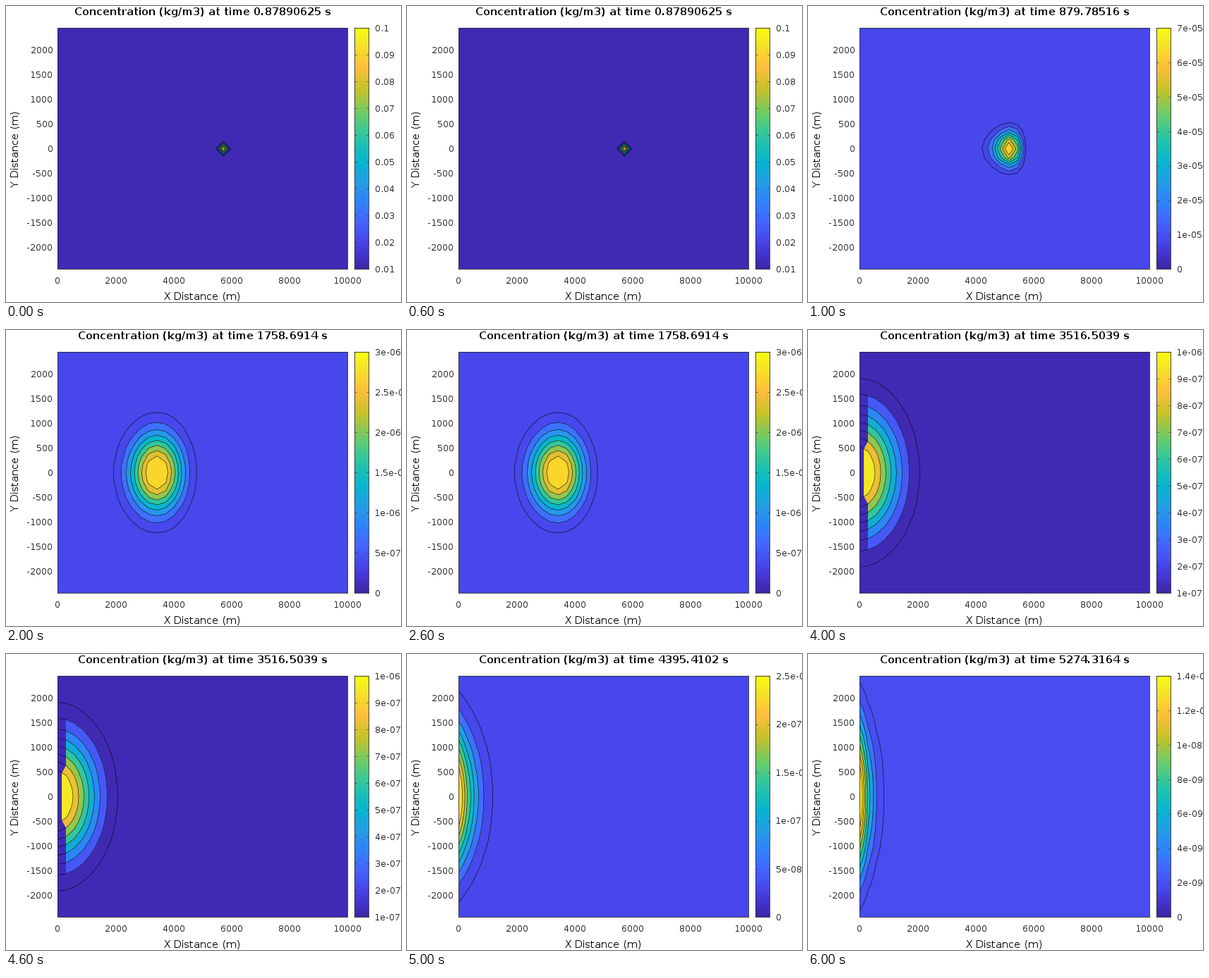
Recreate the animation shown at these times as a matplotlib script. Size 560 by 420 pixels, loop 7 s.

```python
import math
import numpy as np
import matplotlib.pyplot as plt
from matplotlib.animation import FuncAnimation
from matplotlib.colors import LinearSegmentedColormap
from matplotlib.patches import Polygon, Rectangle

W, H, DPI = 560, 420, 100
INK = (0.15, 0.15, 0.15)
PLOT = (73.4, 31.4, 484.4, 373.4)   # left, top, right, bottom in pixels
BAR = (494.4, 31.4, 514.4, 373.4)
SMALL, LARGE = 13.33, 14.67         # text sizes in pixels

X_MAX, Y_MAX = 10000, 2450
DX, DY = X_MAX / 35, 175
GX = np.arange(36) * DX
GY = np.arange(-14, 15) * DY

T_START, T_STEP = 0.87890625, 878.90625
PEAK = 9.55                         # sampled maximum in level steps
LEVELS = np.arange(1, 9)
LEVEL_STEPS = [1.15e-2, 7.75e-6, 3.38e-7, 1.29e-7, 1.19e-7, 2.86e-8, 1.7e-9]

STOPS = {0: "#3e26a8", 3: "#4332cb", 7: "#4747eb", 12: "#4563fd",
         14: "#3e6fff", 17: "#2f81fa", 22: "#259be8", 28: "#08b5d0",
         32: "#19bfb6", 36: "#37c897", 40: "#64cd6f", 47: "#c5c22a",
         53: "#febe3c", 57: "#fad62d", 60: "#f5e924", 63: "#f9fb15"}
CMAP = LinearSegmentedColormap.from_list(
    "field", [(k / 63, c) for k, c in STOPS.items()], N=64)

plt.rcParams.update({"font.family": "DejaVu Sans", "text.hinting": "default",
                     "text.hinting_factor": 1})
fig = plt.figure(figsize=(W / DPI, H / DPI), dpi=DPI, facecolor="white")


def put(x, y, s, px, **kw):
    kw = {"color": INK, "ha": "center", "va": "baseline", **kw}
    fig.text(x / W, 1 - y / H, s, fontsize=px * 72 / DPI, **kw)


def pixel_axes(box):
    x0, y0, x1, y1 = box
    ax = fig.add_axes([x0 / W, 1 - y1 / H, (x1 - x0) / W, (y1 - y0) / H])
    ax.set(xticks=[], yticks=[])
    for spine in ax.spines.values():
        spine.set(color=INK, linewidth=0.6)
    return ax


def centre(i):
    """The plume rests at its source, then drifts at a steady speed."""
    return min(20 * DX, 18 * DX - 1738 * (i - 1))


def plume(i):
    lateral = 248 + 472 * math.log(max(i, 0.6))
    axial = 60 + 1.05 * lateral
    skew = 0.55 * max(i, 1) ** -2.5
    u = GX - centre(i)
    along = (np.abs(u) / axial) ** (2 + skew * np.sign(u))
    across = (GY / lateral) ** 2
    z = np.exp(-(along[None, :] + across[:, None]) / 2)
    return PEAK * z / z.max()


def color_range(step):
    """Round limits and tick step that enclose all contour levels."""
    raw = (LEVELS[-1] - LEVELS[0]) * step / 5
    power = 10.0 ** math.floor(math.log10(raw))
    m = raw / power
    tick = power * (1 if m < 2 else 2 if m < math.sqrt(10) else 5)
    low = math.floor(LEVELS[0] * step / tick) * tick
    high = math.ceil(LEVELS[-1] * step / tick) * tick
    return low, high, tick


def cover_inlet(ax, colors, z):
    """The first grid column keeps the base colour, apart from the core."""
    def reach(k, col):
        return np.interp(-k, -z[14:, col], GY[14:])

    ax.add_patch(Rectangle((0, -Y_MAX), DX, 2 * Y_MAX, fc=colors[0],
                           ec="none", zorder=1.2))
    edge = (reach(8, 0) + reach(8, 1)) / 2
    for k in (7, 8):
        y = reach(k, 1)
        ax.add_patch(Polygon(
            [(DX / 2, edge), (DX, y), (DX, -y), (DX / 2, -edge)],
            fc=colors[k - 1], ec="none", zorder=1.3))


def draw_field(i, low, high):
    z = plume(i)
    share = (LEVELS * LEVEL_STEPS[i] - low) / (high - low)
    colors = CMAP(np.rint(share * 63).astype(int))
    ax = pixel_axes(PLOT)
    ax.set_facecolor(colors[0])
    ax.contourf(GX, GY, z, levels=[*LEVELS[1:], 20], colors=colors[1:],
                zorder=1)
    if abs(centre(i)) < DX:
        cover_inlet(ax, colors, z)
    ax.contour(GX, GY, z, levels=LEVELS, colors="black", linewidths=0.4,
               zorder=2)
    ax.set(xlim=(0, X_MAX), ylim=(-Y_MAX, Y_MAX))


def draw_bar(low, high, tick):
    ax = pixel_axes(BAR)
    ax.set_facecolor(CMAP(0))
    ax.imshow(np.arange(64)[:, None], cmap=CMAP, origin="lower", aspect="auto",
              extent=(0, 1, 0, 1), interpolation="nearest")
    top, bottom = BAR[1], BAR[3]
    count = round((high - low) / tick)
    for n in range(count + 1):
        f = n / count
        for x in (0, 0.85):
            ax.plot([x, x + 0.15], [f, f], color=INK, lw=0.4)
        put(522.5, bottom - f * (bottom - top) + 4.6,
            f"{low + n * tick:.4g}", SMALL, ha="left")
    ax.set(xlim=(0, 1), ylim=(0, 1), xticks=[], yticks=[])


def draw_labels(i):
    left, top, right, bottom = PLOT
    cx, cy = (left + right) / 2, (top + bottom) / 2
    for v in range(0, X_MAX + 1, 2000):
        put(left + v / X_MAX * (right - left), 394, str(v), SMALL)
    for v in range(-2000, 2001, 500):
        y = cy - v / Y_MAX * (bottom - top) / 2
        put(66.5, y + 4.6, str(v), SMALL, ha="right")
    put(cx, 417, "X Distance (m)", LARGE, color="black")
    put(18, cy, "Y Distance (m)", LARGE, color="black", rotation=90,
        rotation_mode="anchor")
    t = T_START + T_STEP * i
    put(cx, 12.6, f"Concentration (kg/m3) at time {t:.8g} s", LARGE,
        color="black", weight="bold")


def draw(i):
    fig.clear()
    low, high, tick = color_range(LEVEL_STEPS[i])
    draw_field(i, low, high)
    draw_bar(low, high, tick)
    draw_labels(i)
    return []


anim = FuncAnimation(fig, draw, frames=len(LEVEL_STEPS), init_func=lambda: [],
                     interval=1000, repeat=True, repeat_delay=0, blit=False)
plt.show()
```
